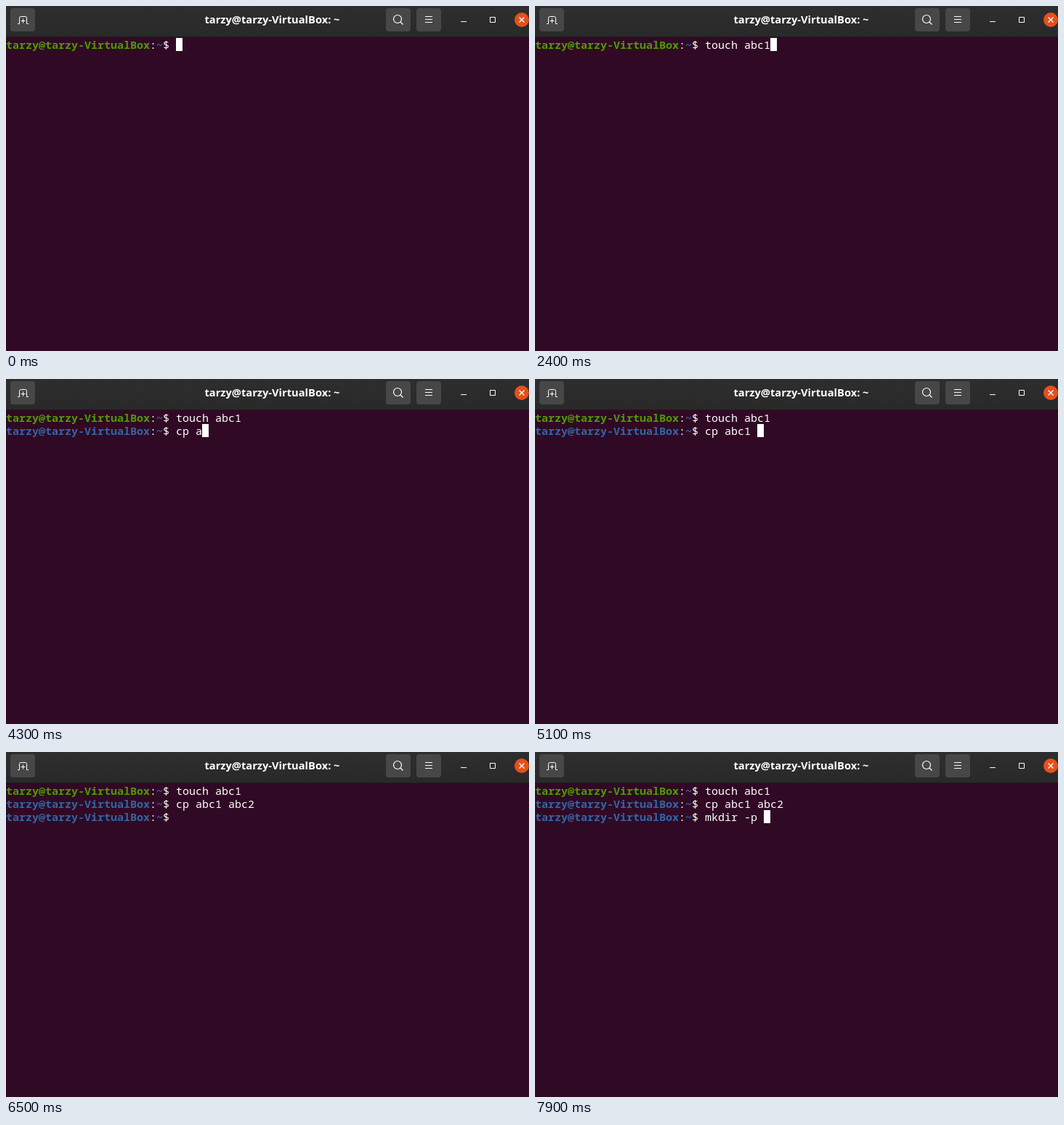
An HTML page for the animation above (8000 ms loop, 720x475 px).

```html
<!DOCTYPE html>
<html lang="en">
<head>
<meta charset="utf-8">
<title>Terminal</title>
<style>
  html, body { margin: 0; width: 720px; height: 475px; overflow: hidden; background: #300a24; }
  svg { position: absolute; left: 0; top: 0; }
  #screen {
    position: absolute; left: 0; top: 44px; margin: 0; color: #fff;
    font: 15px/18px "Noto Sans Mono", "Liberation Mono", monospace;
    font-variant-ligatures: none;
  }
  #screen b { color: #4e9a06; }
  #screen b + b { color: #3465a4; }
  #cursor { position: absolute; width: 9px; height: 18px; background: #fff; }
</style>
</head>
<body>
<svg width="720" height="43" fill="none" stroke="#fff">
  <defs>
    <linearGradient id="bar" x2="0" y2="1">
      <stop stop-color="#2e2e2e"/><stop offset="1" stop-color="#292929"/>
    </linearGradient>
  </defs>
  <g stroke="none">
    <rect width="720" height="42" fill="url(#bar)"/>
    <rect y="42" width="720" height="1" fill="#1f1a1d"/>
    <g fill="#474747">
      <rect x="6" y="3" width="34" height="32" rx="4"/>
      <rect x="523" y="3" width="34" height="32" rx="4"/>
      <rect x="565" y="3" width="34" height="32" rx="4"/>
    </g>
    <circle cx="710" cy="19" r="10" fill="#e5501c"/>
    <text x="366.5" y="24" text-anchor="middle" fill="#fff"
      font-family="'Open Sans', 'Noto Sans', sans-serif" font-weight="700" font-size="14.67">tarzy@tarzy-VirtualBox: ~</text>
  </g>
  <path d="M16 24.5h2.5v-8q0-2 2-2h6q2 0 2 2v8h2.500M20.500 20.500h6M23.500 17.500v6"/>
  <circle cx="539" cy="18" r="5.500" stroke-width="1.200"/>
  <path d="M543 22l3.500 3.500" stroke-width="1.300"/>
  <path d="M577 14.500h10M577 18.500h10M577 22.500h10M626 21.500h8M666.500 15.500h7v7h-7z"/>
  <path d="M706.500 15.500l7 7M713.500 15.500l-7 7" stroke-width="1.400"/>
</svg>
<pre id="screen"><span id="text"></span><i id="cursor"></i></pre>
<script>
const DURATION = 8000;
const PROMPT = "<b>tarzy@tarzy-VirtualBox</b>:<b>~</b>$ ";
const PROMPT_COLUMNS = 26;

// [ms, typed text] or [ms, cursor visible]
const events = [
  [100, false], [700, true], [800, "t"],
  [1000, "ou"], [1100, "c"], [1200, "h"], [1300, " "], [1400, "a"], [1500, "b"],
  [2000, false], [2100, true], [2200, "c"], [2400, "1"], [2600, "\n"],
  [3100, false], [3700, true],
  [4000, "c"], [4100, "p"], [4200, " "], [4300, "a"], [4500, "b"], [4700, "c"],
  [5000, "1"], [5100, " "], [5200, "a"], [5300, "b"], [5500, "c"], [5700, "2"], [5900, "\n"],
  [6500, false],
  [7000, "m"], [7100, "k"], [7200, "d"], [7300, "i"], [7500, "r "], [7600, "-"],
  [7800, "p"], [7900, " "]
];

const text = document.getElementById("text");
const cursor = document.getElementById("cursor");
let shown = -1;

function render(count) {
  let typed = "", visible = true;
  for (const [, action] of events.slice(0, count)) {
    if (typeof action === "string") typed += action;
    visible = action !== false;
  }
  const lines = typed.split("\n");
  text.innerHTML = lines.map(line => PROMPT + line).join("\n");
  cursor.style.left = (PROMPT_COLUMNS + lines.at(-1).length) * 9 + "px";
  cursor.style.top = (lines.length - 1) * 18 + "px";
  cursor.style.visibility = visible ? "visible" : "hidden";
}

function tick() {
  const time = performance.now() % DURATION;
  const count = events.filter(([start]) => start <= time).length;
  if (count !== shown) render(shown = count);
  requestAnimationFrame(tick);
}
tick();
</script>
</body>
</html>
```
